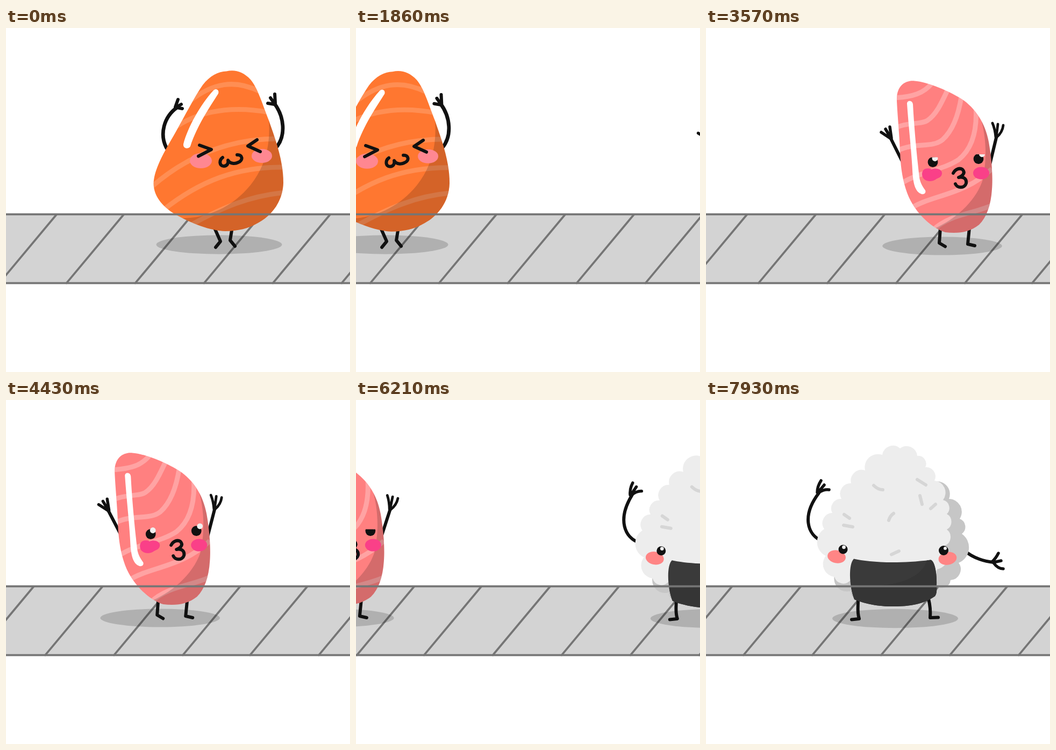
These frames come from a looping animation (640x640 px, 8000 ms). An HTML page:

```html
<!DOCTYPE html>
<html lang="en">
<head>
<meta charset="utf-8">
<title>Sushi belt</title>
<style>
  html, body { margin: 0; width: 100%; height: 100%; overflow: hidden; background: #fff; }
  svg { display: block; width: 100vw; height: 100vh; }
  .ink { fill: none; stroke: #111; stroke-width: 6; stroke-linecap: round; stroke-linejoin: round; }
  .rail { fill: none; stroke: #757575; stroke-width: 3.8; stroke-linecap: round; }
  .stripe { fill: none; stroke: #fff; stroke-width: 9; }
  .grain { fill: none; stroke: #d6d6d6; stroke-width: 6; stroke-linecap: round; }
  .shadow { fill: #000; fill-opacity: .165; }
  .shade { fill: #000; fill-opacity: .17; }
  .dot { fill: #111; }
  .glint { fill: #f0f0f0; }
</style>
</head>
<body>
<svg viewBox="0 0 640 640">
  <defs>
    <path id="nigiriShape" d="M410 80.5C426 77 441 81 455 96C468 112 474 133 489 172C500 204 516 245 516 288C515 325 492 350 470 362C452 373 430 378 408 378C380 377 345 364 312 345C290 331 275 312 274.5 290C275 262 296 228 316 193C333 163 350 129 366 106C379 89 395 81 410 80.5Z"/>
    <path id="sliceShape" d="M355 135C354 108 370 97 388 98.5C412 100 455 118 480 135C505 154 520 180 526 212C531 240 534 275 532 300C530 330 522 352 508 366C490 380 470 383 445 380C420 372 395 348 381 322C368 297 362 265 361 230C360 200 356 160 355 135Z"/>
    <path id="noriShape" d="M275 295.5C300 301 350 306 418 297.5C426 299 430 325 429 345C430 358 428 362 426 365C400 383 370 384 345 384C315 384 290 377 276 371C266 345 265 305 275 295.5Z"/>
    <clipPath id="nigiriClip"><use href="#nigiriShape"/></clipPath>
    <clipPath id="sliceClip"><use href="#sliceShape"/></clipPath>
    <clipPath id="noriClip"><use href="#noriShape"/></clipPath>
    <clipPath id="lidLeft"><rect class="lid" data-y="249" x="405" width="40" height="40"/></clipPath>
    <clipPath id="lidRight"><rect class="lid" data-y="243.5" x="490" width="40" height="40"/></clipPath>
  </defs>

  <path fill="#d3d3d3" d="M0 346.5H640V474.5H0Z"/>
  <g id="world">
    <path id="seams" class="rail"/>

    <g id="nigiri">
      <ellipse class="shadow" cx="396.5" cy="403" rx="117" ry="17.7"/>
      <path class="ink" d="M387 370L399 397L390 408M421 370L417 395L426 406"/>
      <g id="nigiriArms" class="ink">
        <path stroke-width="6.8" d="M308 238L298 222C286 198 293 166 318 148M495 232L503 222C521 200 518 165 499 140"/>
        <path d="M315 147L320 133M317 147L326 142M318 148L328 150M501 140L500 123M499 140L492 130M499 142L487 140"/>
      </g>
      <g id="nigiriBody">
        <use href="#nigiriShape" fill="#ff7730"/>
        <g clip-path="url(#nigiriClip)">
          <path class="stripe" stroke-opacity=".17" d="M342 136C385 102 425 95 472 118M300 196C345 158 410 142 490 157M268 298C330 243 410 205 510 206M292 339C360 285 430 257 520 259M343 367C400 335 455 311 520 306"/>
          <path class="shade" d="M489 172C492 215 484 255 455 292C420 335 372 355 320 354L330 400H540V172Z"/>
        </g>
        <path fill="#fff" d="M386 116C392 111 397 116 395 122C380 146 356 180 343 220C340 226 329 225 330 216C338 185 362 142 386 116Z"/>
        <g fill="#ff8791">
          <ellipse cx="362.5" cy="247" rx="20.5" ry="14"/>
          <ellipse cx="476" cy="238" rx="19" ry="13"/>
        </g>
        <path class="ink" d="M360 218L382 226L358 238.500M467 208L450 219.500L473 230M403 241C396 246 397 257 405 257C412 257 414 251 413 246C417 253 426 253 432 250C442 246 440 235 430 236"/>
      </g>
    </g>

    <g id="slice">
      <ellipse class="shadow" cx="439.5" cy="405.500" rx="111.300" ry="17"/>
      <path class="ink" d="M436 372L434 400L445 406.500M490 372L487 402L500 405"/>
      <g id="sliceArmL" class="ink">
        <path d="M367 252L344 206"/>
        <path stroke-width="5.500" d="M344 206L326 194M344 205L334 188M345 205L342 184"/>
      </g>
      <g id="sliceArmR" class="ink">
        <path d="M527 258L540 204"/>
        <path stroke-width="4.800" d="M539 203C538 192 536 184 533 177M540 203L543 179M541 203C549 196 552 190 553 181"/>
      </g>
      <use href="#sliceShape" fill="#ff8080"/>
      <g clip-path="url(#sliceClip)">
        <path class="stripe" stroke-width="8" stroke-opacity=".27" d="M350 130C385 128 405 122 421 102M354 185C375 175 400 180 412 172C430 160 440 135 452 110M356 228C390 212 420 224 440 208C460 190 470 160 475 128M362 290C395 268 440 265 470 245C495 225 505 190 502 145M380 336C420 310 480 312 532 262M422 376C455 345 500 346 536 328"/>
        <path class="shade" d="M508 158C524 205 522 250 514 285C500 325 460 360 416 377L430 400H550V158Z"/>
      </g>
      <path fill="#fff" d="M374 141C374 134 384 134 385 142C387 180 391 225 396 270C397 288 404 296 408 302C410 308 404 311 399 308C388 303 385 285 384 265C382 225 377 185 374 141Z"/>
      <g fill="#fa4088">
        <path d="M402 272C402 260 414 260 420 263C428 259 440 263 439 271C438 279 430 279 427 282C418 288 402 285 402 272Z"/>
        <ellipse cx="512" cy="270" rx="15" ry="11.500"/>
      </g>
      <g clip-path="url(#lidLeft)">
        <circle class="dot" cx="422" cy="249.500" r="9.400"/><circle class="glint" cx="426" cy="242.500" r="5.400"/>
      </g>
      <g clip-path="url(#lidRight)">
        <circle class="dot" cx="507" cy="243.500" r="9.400"/><circle class="glint" cx="513.500" cy="234.800" r="5.400"/>
      </g>
      <path class="ink" d="M460 270C464 262 472 260 477 263C484 270 476 276 470 278C480 276 485 281 484 289C481 299 467 298 464 290"/>
    </g>

    <g id="rice">
      <ellipse class="shadow" cx="352" cy="406.500" rx="117" ry="17.700"/>
      <path class="ink" d="M283 374C283 385 281 395 285 407L271 408.500M414 370C417 382 418 392 417 405L432 404.500"/>
      <g id="riceBody">
        <g id="riceArmL" class="ink">
          <path d="M224 264L215 262C188 250 178 215 210 173"/>
          <path stroke-width="5.500" d="M207 172C207 162 210 156 214 150M209 171L220 158M210 172C216 168 223 166 229 167"/>
        </g>
        <g id="riceArmR" class="ink">
          <path d="M472 272L478 278C495 293 515 300 535 302"/>
          <path stroke-width="5.500" d="M532 301C538 296 541 291 544 285M535 302L549 299M535 303C540 310 546 314 553 314"/>
        </g>
        <path id="riceBack" fill="#c6c6c6"/>
        <path id="riceFront" fill="#ededed"/>
        <path class="grain" d="M257 213L267 220M256 233L273 236M312 159Q320 167 329 167M393 148L409 158M398 178L402 194M418 202L427 194M349 211Q342 216 340 224M345 287.500L359 281"/>
        <use href="#noriShape" fill="#3a3a3a"/>
        <path clip-path="url(#noriClip)" fill="#353535" d="M412 295C402 335 350 350 260 347V390H435V295Z"/>
        <g fill="#ff8585">
          <ellipse cx="243" cy="291.500" rx="17" ry="12" transform="rotate(10 243 291.500)"/>
          <ellipse cx="449.500" cy="294.800" rx="17" ry="12" transform="rotate(-10 449.500 294.800)"/>
        </g>
        <circle class="dot" cx="255" cy="278" r="8.500"/><circle class="glint" cx="256.500" cy="273.800" r="3.400"/>
        <circle class="dot" cx="442" cy="280" r="9"/><circle class="glint" cx="445" cy="276" r="3"/>
      </g>
    </g>
  </g>
  <path class="rail" d="M-5 346.600H645M-5 474.600H645"/>
</svg>
<script>
const $ = id => document.getElementById(id);
const place = (id, value) => $(id).setAttribute('transform', value);

const LOOP = 8000, SHOWN_FPS = 14, DRAWN_FPS = 25;
const SPEED = 7.275;   // belt pixels per drawn step
const CYCLE = 40;      // drawn steps per bounce

// Outline made of rounded bumps between clockwise points.
function bumps(points) {
  let [px, py] = points[0], d = `M${px} ${py}`;
  for (const [x, y] of points.slice(1)) {
    const r = Math.hypot(x - px, y - py) * .57;
    d += `A${r} ${r} 0 0 1 ${x} ${y}`;
    [px, py] = [x, y];
  }
  return d + 'Z';
}

$('riceFront').setAttribute('d', bumps([
  [268, 336], [239, 329], [223, 290], [220, 240], [235, 210], [252, 184], [270, 155],
  [296, 131], [328, 102], [361, 90], [393, 104], [408, 125], [425, 150], [441, 186],
  [448, 212], [448, 241], [444, 271], [430, 315], [350, 345]
]));
$('riceBack').setAttribute('d', bumps([
  [282, 368], [270, 355], [239, 327], [300, 300], [426, 152], [452, 184], [472, 221],
  [476, 249], [470, 303], [455, 335], [428, 346], [400, 366]
]));

// Belt tiles are 128 wide; every ninth one is 3 short.
let seams = '';
for (let lap = -1; lap < 2; lap++)
  for (let i = 0; i < 9; i++) {
    const x = 112.5 + lap * 1149 + i * 128;
    seams += `M${x} 474.600L${x + 106.500} 347`;
  }
$('seams').setAttribute('d', seams);

place('slice', `translate(${90 * SPEED} 0)`);
place('rice', `translate(${199 * SPEED} 0)`);

// 0 at the top of the bounce, 2 at the bottom.
const dip = (step, top) => 1 - Math.cos((step - top) / CYCLE * 2 * Math.PI);

function draw(time) {
  const shown = Math.floor((time % LOOP + 5) * SHOWN_FPS / 1000) % (LOOP * SHOWN_FPS / 1000);
  const step = Math.ceil(shown * DRAWN_FPS / SHOWN_FPS);
  place('world', `translate(${-SPEED * step} 0)`);

  const bob = dip(step, 2) - .049;
  place('nigiriBody', `translate(0 ${3.25 * bob})`);
  place('nigiriArms', `rotate(${2.250 * bob} 408 165)`);

  const wave = 5.500 * Math.sin((step - 10) / CYCLE * 2 * Math.PI);
  place('sliceArmL', `rotate(${wave} 362 245)`);
  place('sliceArmR', `rotate(${-wave} 530 247)`);

  const fromBlink = Math.abs(step % 32 - 28.300);
  const lid = Math.max(-16, -2.200 - 2.750 * fromBlink);
  for (const rect of document.querySelectorAll('.lid'))
    rect.setAttribute('y', +rect.dataset.y + lid);

  const squat = dip(step, 1.500) - .076;
  place('riceBody', `translate(0 ${10 * squat})`);
  place('riceArmL', `rotate(${-22 * squat} 222 265)`);
  place('riceArmR', `rotate(${-22 * squat} 475 276)`);
}

const start = performance.now();
function tick() {
  draw(performance.now() - start);
  requestAnimationFrame(tick);
}
tick();
</script>
</body>
</html>
```
